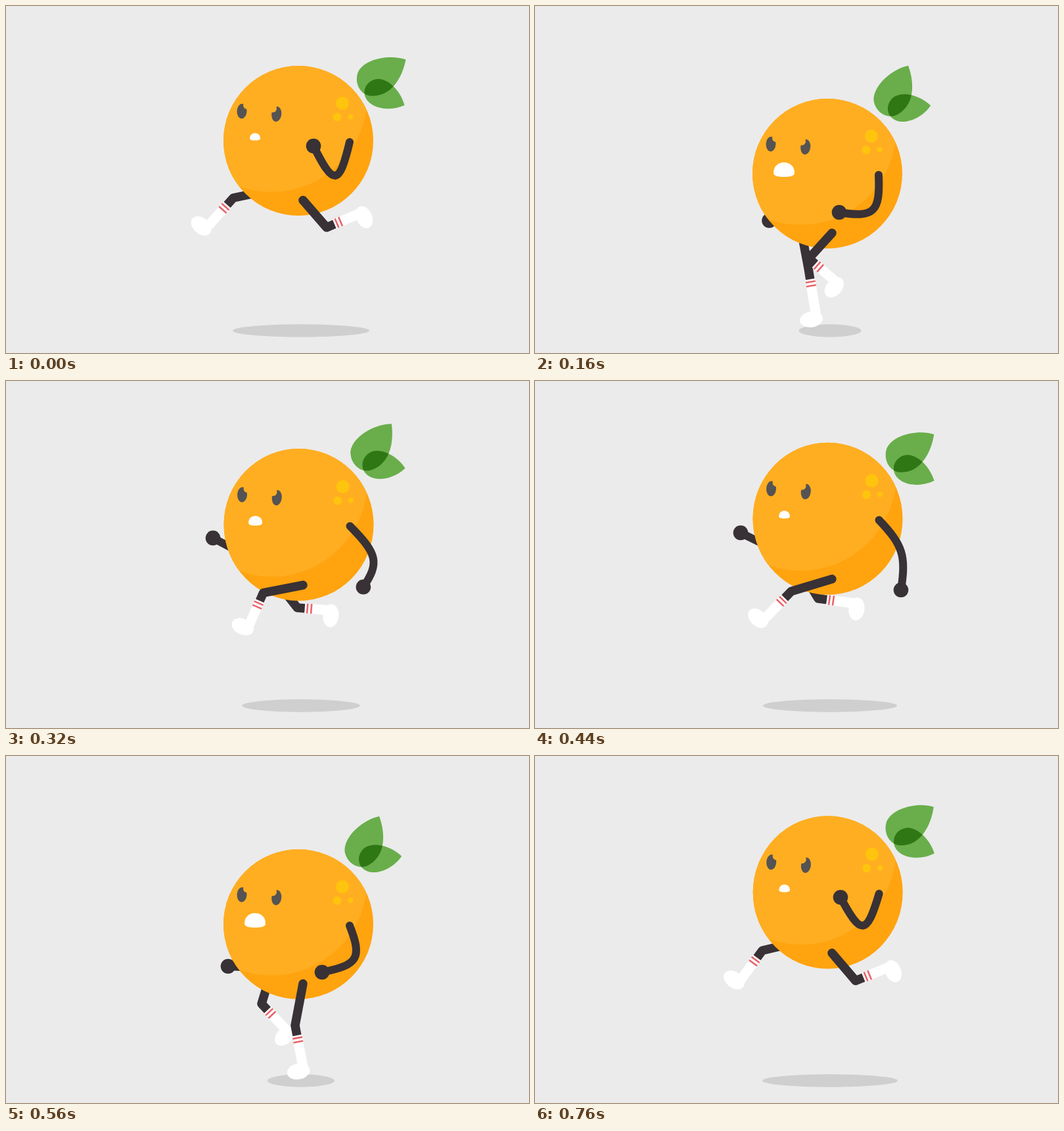
Recreate the animation shown at these times as an HTML page with a canvas. Size 796 by 528 pixels, loop 0.8 s.

```html
<!DOCTYPE html>
<html lang="en">
<head>
<meta charset="utf-8">
<title>Running orange</title>
<style>
  html, body { margin: 0; width: 100%; height: 100%; overflow: hidden; background: #ebebeb; }
  canvas { display: block; }
</style>
</head>
<body>
<canvas id="stage" width="796" height="528"></canvas>
<script>
const ctx = document.getElementById('stage').getContext('2d');
const LOOP = 800, STEP = 40, TAU = Math.PI * 2;
const DARK = '#383135', LIGHT = '#ffae21';

// Rows are [time, values...]; limb heights are relative to the body centre.
const BODY = [ // centre y, vertical stretch, shadow half width, mouth scale
  [0, 205, 1, 104, .5], [40, 209.5, 1.015, 102, .52], [160, 255, 1, 47.5, 1],
  [240, 248, .982, 53, 1], [360, 207.5, 1.02, 103, .52], [400, 205, 1, 104, .5],
  [440, 209.5, 1.015, 102, .52], [560, 256, 1, 51, 1], [640, 254, .982, 73, 1],
  [760, 207.5, 1.02, 103, .52]
];
const LEAF = [ // degrees
  [0, 0], [40, -1.8], [160, -31], [240, -31], [320, -19], [360, -2.5],
  [400, 0], [440, -1.8], [560, -31], [640, -31], [720, -19], [760, -2.5]
];
const NEAR_LEG = [ // knee, ankle
  [0, 488, 132, 542, 109], [40, 477, 136, 535, 136], [160, 417, 129, 460.6, 167],
  [240, 400, 104, 412, 161.5], [360, 390, 106, 353, 156], [400, 390, 106, 347, 152],
  [440, 390, 110.5, 345, 157], [560, 440, 154, 453, 222.5],
  [640, 455, 151, 492.7, 202], [760, 488, 134.5, 542, 112.5]
];
const FAR_LEG = [
  [0, 346, 87, 303, 135], [40, 346, 90, 301, 137], [160, 416, 144, 428.5, 220.5],
  [240, 442, 133, 480.7, 197.7], [360, 441, 124, 495, 108], [400, 440, 122, 494, 108],
  [440, 431, 121.5, 490.5, 129.5], [560, 389, 121, 430, 164.5],
  [640, 368, 108, 395.4, 158], [760, 346, 88.5, 309.5, 138]
];
const NEAR_ARM = [ // elbow, hand
  [0, 501, 53, 468, 8], [40, 503, 54, 468, 21], [160, 514, 55, 463, 59],
  [240, 543, 52, 500, 81], [400, 561, 50, 566, 104], [440, 557, 50, 557, 108.5],
  [560, 530, 52, 481, 73], [640, 514, 54, 462, 55], [760, 499, 50.5, 465, 7.5]
];
const FAR_HAND = [
  [0, 420, 70], [160, 356.5, 71.5], [240, 329, 54], [360, 312, 10], [400, 311, 11],
  [440, 313, 21.5], [560, 338, 64], [640, 361, 70.5], [760, 415, 75]
];

// Smooth periodic curve through all rows of a track.
function sample(track, t) {
  const n = track.length;
  const row = i => track[(i + n) % n];
  const time = i => row(i)[0] + LOOP * Math.floor(i / n);
  let i = n - 1;
  while (track[i][0] > t) i--;
  const h = time(i + 1) - time(i), u = (t - time(i)) / h;
  const slope = (j, c) => (row(j + 1)[c] - row(j)[c]) / (time(j + 1) - time(j));
  const tangent = (j, c) => {
    const a = time(j) - time(j - 1), b = time(j + 1) - time(j);
    return (slope(j - 1, c) * b + slope(j, c) * a) / (a + b);
  };
  return row(i).slice(1).map((p, k) => {
    const c = k + 1, q = row(i + 1)[c], v = 1 - u;
    return p * v * v * (1 + 2 * u) + q * u * u * (3 - 2 * u)
      + h * u * v * (v * tangent(i, c) - u * tangent(i + 1, c));
  });
}

function ellipse(x, y, rx, ry, color, angle = 0) {
  ctx.fillStyle = color;
  ctx.beginPath();
  ctx.ellipse(x, y, rx, ry, angle, 0, TAU);
  ctx.fill();
}
const dot = (x, y, r, color) => ellipse(x, y, r, r, color);

function line(points, width, color, cap = 'butt') {
  ctx.strokeStyle = color;
  ctx.lineWidth = width;
  ctx.lineCap = cap;
  ctx.lineJoin = 'round';
  ctx.beginPath();
  points.forEach(p => ctx.lineTo(p[0], p[1]));
  ctx.stroke();
}

function leg(hipX, hipY, [kx, ky, ax, ay], cy) {
  ky += cy;
  ay += cy;
  const len = Math.hypot(ax - kx, ay - ky);
  const ux = (ax - kx) / len, uy = (ay - ky) / len;
  const along = d => [kx + ux * d, ky + uy * d];
  const top = len * .22;
  line([[hipX, hipY], [kx, ky], along(top + 1)], 13.5, DARK, 'round');
  line([along(top), [ax, ay]], 15, '#fff');
  for (const d of [4, 10]) line([along(top + d - 1.3), along(top + d + 1.3)], 15, '#e8646a');
  ellipse(ax - uy * 8, ay + ux * 8, 17.5, 12, '#fff', Math.atan2(ux, -uy));
}

function nearArm(sx, sy, [ex, ey, hx, hy], cy) {
  ey += cy;
  hy += cy;
  // Corner that makes the curve pass through the elbow.
  const k = .85, end = .125 + .375 * (1 - k);
  const cx = (ex - end * (sx + hx)) / (.75 * k);
  const cornerY = (ey - end * (sy + hy)) / (.75 * k);
  const mix = (a, b) => a + (b - a) * k;
  ctx.strokeStyle = DARK;
  ctx.lineWidth = 12;
  ctx.lineCap = 'round';
  ctx.beginPath();
  ctx.moveTo(sx, sy);
  ctx.bezierCurveTo(mix(sx, cx), mix(sy, cornerY), mix(hx, cx), mix(hy, cornerY), hx, hy);
  ctx.stroke();
  dot(hx, hy, 11.3, DARK);
}

function farArm([hx, hy], cy) {
  line([[hx, hy + cy], [Math.max(365, hx), cy + 38 + .43 * hy]], 12, DARK);
  dot(hx, hy + cy, 11.3, DARK);
}

const bigLeaf = new Path2D('M163.5-123.5C140-132 101-125 91-105C85-90 92-72 108-68.5C140-65 158-95 163.5-123.5Z');
const smallLeaf = new Path2D('M161.5-54C155-77 137-94 121-94C107-93 98-81 101-69C106-50 137-43 161.5-54Z');
const mouth = new Path2D('M-16 5C-16-6-8-11 0-11C8-11 16-6 16 5C16 10 8 11 0 11C-8 11-16 10-16 5Z');

function leaves(angle) {
  ctx.save();
  ctx.translate(70, -71);
  ctx.rotate(angle * Math.PI / 180);
  ctx.translate(-70, 71);
  ctx.fillStyle = '#69ae4b';
  ctx.fill(bigLeaf);
  ctx.fill(smallLeaf);
  ctx.clip(bigLeaf);
  ctx.fillStyle = '#2f7714';
  ctx.fill(smallLeaf);
  ctx.restore();
}

function fruit(cx, cy, stretch, mouthScale, leafAngle) {
  ctx.save();
  ctx.translate(cx, cy);
  ctx.scale(1, stretch);
  leaves(leafAngle);

  dot(0, 0, 114, '#ffa30f');
  ctx.save();
  ctx.beginPath();
  ctx.arc(0, 0, 114, 0, TAU);
  ctx.clip();
  dot(-41, -68, 146, LIGHT);
  ctx.restore();

  dot(67, -57, 10, '#ffc40d');
  dot(59, -36, 6.5, '#ffc40d');
  dot(79.5, -36.5, 4, '#ffc40d');

  ellipse(-86, -45, 7.5, 11.3, '#555353', .05);
  dot(-78, -54, 6, LIGHT);
  ellipse(-33.3, -40.5, 7.5, 11.5, '#555353', .12);
  dot(-39, -49, 6, LIGHT);

  ctx.translate(-66, -6);
  ctx.scale(mouthScale, mouthScale);
  ctx.fillStyle = '#fff';
  ctx.fill(mouth);
  ctx.restore();
}

function draw(t) {
  const [cy, stretch, shadow, mouthScale] = sample(BODY, t);
  const shift = (stretch - 1) * 35;
  ctx.fillStyle = '#ebebeb';
  ctx.fillRect(0, 0, 796, 528);
  ellipse(449, 494, shadow, 9.7, '#cfcfcf');
  farArm(sample(FAR_HAND, t), cy);
  leg(403, cy + 75, sample(FAR_LEG, t), cy);
  fruit(445 + shift, cy, stretch, mouthScale, sample(LEAF, t)[0]);
  leg(452, cy + 90.5 * stretch, sample(NEAR_LEG, t), cy);
  nearArm(523 + shift, cy + 2, sample(NEAR_ARM, t), cy);
}

// The run is drawn on a 25 fps beat.
function tick() {
  draw(Math.floor(performance.now() % LOOP / STEP) * STEP);
  requestAnimationFrame(tick);
}
tick();
</script>
</body>
</html>
```
